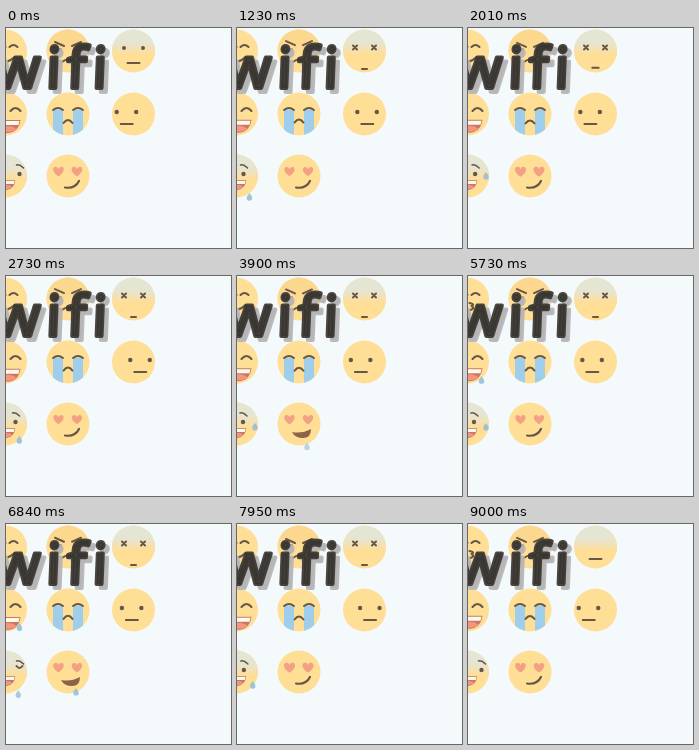
Animation, 225 px wide and 220 px high, one loop 9.03 s. Source, as an HTML page with a canvas:

```html
<!DOCTYPE html>
<html lang="en">
<head>
<meta charset="utf-8">
<title>wifi</title>
<style>
html, body { margin: 0; width: 100%; height: 100%; overflow: hidden; background: #f4f9fb; }
canvas { display: block; }
</style>
</head>
<body>
<canvas id="stage" width="225" height="220"></canvas>
<script>
const c = document.getElementById('stage').getContext('2d');
const LOOP = 9030, TAU = Math.PI * 2;
const INK = '#665748', SKIN = '#ffde95', BLUE = '#9fcdec';

const phase = (t, cycles) => t * cycles / LOOP % 1;

// Smoothly interpolates [phase, value] pairs.
function track(p, keys) {
  for (let i = 1; i < keys.length; i++) {
    const [a, from] = keys[i - 1], [b, to] = keys[i];
    if (p <= b) {
      const u = (p - a) / (b - a);
      return from + (to - from) * u * u * (3 - 2 * u);
    }
  }
  return keys[keys.length - 1][1];
}

function dot(x, y, r, color = INK) {
  c.fillStyle = color;
  c.beginPath();
  c.arc(x, y, r, 0, TAU);
  c.fill();
}

function line(path, width = 2, color = INK) {
  c.strokeStyle = color;
  c.lineWidth = width;
  c.stroke(new Path2D(path));
}

function fill(path, color) {
  c.fillStyle = color;
  c.fill(new Path2D(path));
}

// Draws a face around its own centre, clipped to the disc.
function face(x, y, draw, top) {
  c.save();
  c.translate(x, y);
  dot(0, 0, 21.5, SKIN);
  c.beginPath();
  c.arc(0, 0, 21.5, 0, TAU);
  c.clip();
  if (top) {
    const g = c.createLinearGradient(0, -21, 0, 4);
    g.addColorStop(0, top);
    g.addColorStop(0.5, top);
    g.addColorStop(1, SKIN);
    c.fillStyle = g;
    c.fillRect(-22, -22, 44, 26);
  }
  draw();
  c.restore();
}

function drop(x, y, alpha = 1) {
  c.save();
  c.globalAlpha = Math.max(0, Math.min(0.9, alpha));
  c.translate(x, y);
  fill('M0 -4C1 -2.5 2.7 -1 2.7 1A2.7 2.7 0 0 1 -2.7 1C-2.7 -1 -1 -2.5 0 -4Z', '#93bfd8');
  c.restore();
}

function grin(x, y, s = 1) {
  c.save();
  c.translate(x, y);
  c.scale(s, s);
  fill('M-13 -5H13C12 4 6 8 0 8S-12 4 -13 -5Z', '#c97961');
  fill('M-12 -4H12L11 0H-11Z', '#fffaf0');
  fill('M-9 4C-4 0 4 0 9 4C5 8 -5 8 -9 4Z', '#f5957f');
  c.restore();
}

function heart(x, y, s) {
  c.save();
  c.translate(x, y);
  c.scale(s, s);
  fill('M0 4.5C-7 0 -5 -5 -2 -4Q-.5 -4 0 -2Q.5 -4 2 -4C5 -5 7 0 0 4.5Z', '#f3a184');
  c.restore();
}

function kissing(t) {
  const kiss = t > 5300 && t < 6300 || t > 8300;
  line('M-8 -4Q-4 -8 0 -4M4 -4Q8 -8 12 -4');
  if (kiss) line('M2 4Q8 5 4 7Q8 9 3 11');
  else line('M-9 9Q1 14 9 6');
}

function angry(t) {
  const y = Math.sin(phase(t, 6) * TAU);
  line(`M-13 ${-9 + y}L-4 ${-5 + y}M13 ${-9 + y}L4 ${-5 + y}`);
  dot(-8, -1, 2);
  dot(8, -1, 2);
  line('M-6 11Q0 6 6 11');
}

function dizzy(t) {
  const p = phase(t, 5);
  const mouth = track(p, [[0, 12], [0.16, 18], [0.8, 18], [1, 12]]);
  const half = track(p, [[0, 6], [0.16, 2.5], [0.8, 2.5], [1, 6]]);
  for (const x of [-9.5, 9.5]) {
    if (p > 0.08 && p < 0.9) line(`M${x - 2} -5.5L${x + 2} -1.5M${x + 2} -5.5L${x - 2} -1.5`);
    else if (p < 0.95) dot(x, -3, 2);
  }
  line(`M${-half} ${mouth}H${half}`);
}

function laughing(t) {
  const y = Math.sin(phase(t, 7) * TAU);
  line('M-14 -3Q-9 -9 -4 -3M5 -3Q10 -9 15 -3');
  grin(2, 11 + y);
}

function crying(t) {
  const sway = Math.sin(phase(t, 6) * TAU) * 0.5;
  c.fillStyle = BLUE;
  c.fillRect(-15, -4, 10, 26);
  c.fillRect(5, -4, 10, 26);
  line('M-15 -4Q-10 -8 -5 -4M5 -4Q10 -8 15 -4');
  line(`M-4.5 ${9 + sway}Q0 ${3 + sway} 4.5 ${9 + sway}`);
}

function neutral(t) {
  const x = -6.8 * Math.cos(phase(t, 5) * TAU);
  dot(x - 10, -2, 2.2);
  dot(x + 9.5, -2, 2.2);
  line(`M${x - 6} 10H${x + 6}`);
}

function sweating(t) {
  const p = phase(t, 5);
  const x = track(p, [[0, 14], [0.15, 6.5], [0.35, 6.5], [0.51, 10], [0.68, 7], [0.79, 14], [1, 14]]);
  if (p > 0.74 && p < 0.86) line(`M${x - 3} -6Q${x} -2 ${x + 3} -6`);
  else dot(x, -2, 2.2);
  dot(x - 16, -2, 2.2);
  line(`M${x - 3} -11Q${x} -12 ${x + 4} -8`, 1.6);
  grin(0, 8, 0.75);
}

// The mouth opens while it drools.
function smitten(t) {
  const drool = phase(t, 6);
  const s = 1.12 + Math.sin(drool * TAU) * 0.05;
  heart(-9.5, -4.5, s);
  heart(9, -4.5, s);
  if (drool > 0.4 && drool < 0.72) fill('M-7 8Q3 10 12 5Q12 14 4 14Q-4 14 -7 8Z', '#8c6249');
  else line('M-3 11.5Q7 13 11 5', 2.2);
}

function drops(t) {
  const tear = phase(t, 7), sweat = phase(t, 5), drool = phase(t, 6);
  if (tear > 0.2 && tear < 0.55) drop(13.5, 101.5 + tear * 6, (0.55 - tear) * 12);
  if (sweat > 0.06 && sweat < 0.92) {
    drop(track(sweat, [[0.06, 18], [0.25, 18], [0.6, 12.5], [1, 12]]),
      track(sweat, [[0.06, 145], [0.17, 151], [0.51, 164], [0.68, 169], [0.92, 172]]),
      (0.92 - sweat) * 6);
  }
  if (drool > 0.42 && drool < 0.72) drop(70, 161 + (drool - 0.42) * 55, (0.72 - drool) * 5);
}

// A round outline thickens the letters and softens their corners.
function title() {
  c.save();
  c.font = '57px "Noto Sans", sans-serif';
  c.letterSpacing = '6px';
  c.lineWidth = 4;
  c.globalAlpha = 0.92;
  c.transform(1, 0, -0.04, 1, 0, 0);
  const word = (x, y, color) => {
    c.fillStyle = c.strokeStyle = color;
    c.strokeText('wifi', x, y);
    c.fillText('wifi', x, y);
  };
  word(-4.5, 64, '#b5b4b5');
  word(-9, 60, '#383531');
  c.restore();
}

function draw(now) {
  const t = now % LOOP;
  c.fillStyle = '#f4f9fb';
  c.fillRect(0, 0, 225, 220);
  c.lineCap = c.lineJoin = 'round';
  face(-0.5, 23, () => kissing(t));
  face(62, 23, () => angry(t), '#fcd88f');
  face(127.5, 23, () => dizzy(t), '#e5e5d3');
  face(-0.5, 86, () => laughing(t));
  face(62, 86, () => crying(t));
  face(127.5, 86, () => neutral(t));
  face(-0.5, 148, () => sweating(t), '#e5e5d3');
  face(62, 148, () => smitten(t));
  drops(t);
  title();
}

const start = performance.now();
function tick() {
  draw(performance.now() - start);
  requestAnimationFrame(tick);
}
tick();
</script>
</body>
</html>
```
